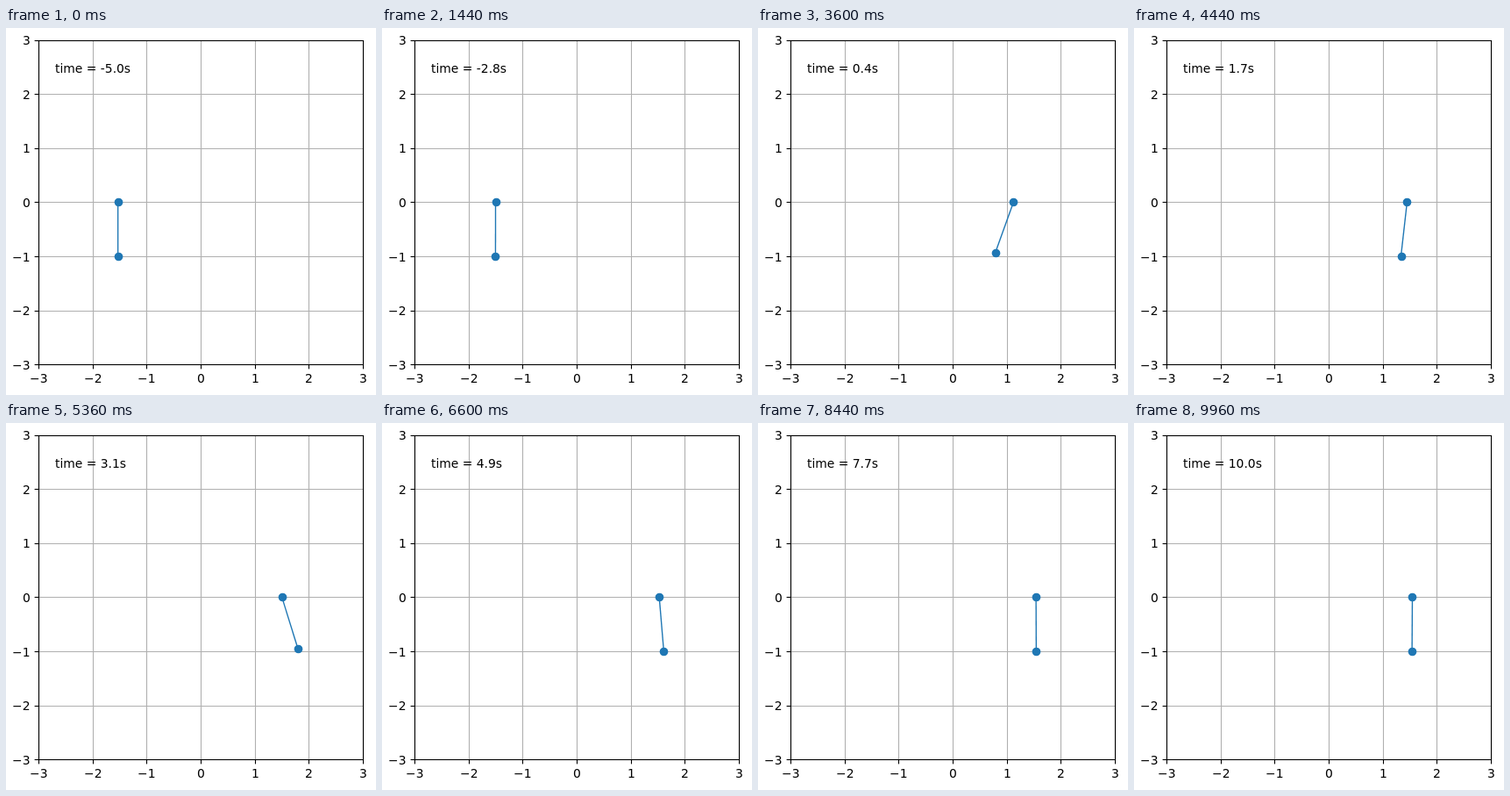
An HTML page with a canvas that plays this animation: 422 by 418 pixels, repeating every 10000 ms.

```html
<!DOCTYPE html>
<html lang="en">
<head>
<meta charset="utf-8">
<title>Pendulum on a moving pivot</title>
<style>
  html, body { margin: 0; width: 100%; height: 100%; overflow: hidden; background: #fff; }
  canvas { display: block; width: 422px; height: 418px; }
</style>
</head>
<body>
<canvas id="stage" width="422" height="418"></canvas>
<script>
const ctx = document.getElementById('stage').getContext('2d');
const FRAMES = 250, FRAME_MS = 40, T0 = -5, T1 = 10;
const LEFT = 37.15, TOP = 13.55, UNIT = 61.6, SPAN = 6;
const GRAVITY = 9.8, DAMPING = 1, SPEED = 5;
const DRIVE_LEAD = 0.015; // the bob reacts slightly ahead of the drawn pivot
const BLUE = '#1f77b4';

const px = x => LEFT + (x + 3) * UNIT;
const py = y => TOP + (3 - y) * UNIT;
const snap = v => Math.round(v) + 0.5;

const pivotX = t => Math.atan(SPEED * t);
const pivotAccel = t => -2 * SPEED ** 3 * t / (1 + (SPEED * t) ** 2) ** 2;
const angularAccel = (t, a, w) =>
  -GRAVITY * Math.sin(a) - pivotAccel(t + DRIVE_LEAD) * Math.cos(a) - DAMPING * w;

// Runge-Kutta integration of the swing, sampled once per frame
function solveSwing() {
  const substeps = 20, dt = (T1 - T0) / (FRAMES - 1), h = dt / substeps;
  const angles = [0];
  let a = 0, w = 0;
  for (let n = 0; n < FRAMES - 1; n++) {
    for (let s = 0; s < substeps; s++) {
      const t = T0 + n * dt + s * h;
      const a1 = w, w1 = angularAccel(t, a, w);
      const a2 = w + w1 * h / 2, w2 = angularAccel(t + h / 2, a + a1 * h / 2, a2);
      const a3 = w + w2 * h / 2, w3 = angularAccel(t + h / 2, a + a2 * h / 2, a3);
      const a4 = w + w3 * h, w4 = angularAccel(t + h, a + a3 * h, a4);
      a += (a1 + 2 * a2 + 2 * a3 + a4) * h / 6;
      w += (w1 + 2 * w2 + 2 * w3 + w4) * h / 6;
    }
    angles.push(a);
  }
  return angles;
}
const angles = solveSwing();

function line(x1, y1, x2, y2, color, width) {
  ctx.strokeStyle = color;
  ctx.lineWidth = width;
  ctx.beginPath();
  ctx.moveTo(x1, y1);
  ctx.lineTo(x2, y2);
  ctx.stroke();
}

function dot(x, y) {
  ctx.fillStyle = BLUE;
  ctx.beginPath();
  ctx.arc(snap(x), snap(y), 4.86, 0, Math.PI * 2);
  ctx.fill();
}

// align: 0 = left, 0.5 = centre, 1 = right; the text starts on a whole pixel
function text(s, x, y, align) {
  ctx.fillStyle = '#000';
  ctx.font = '13.89px "DejaVu Sans", sans-serif';
  ctx.fillText(s, Math.round(x - align * ctx.measureText(s).width), Math.round(y));
}

function drawAxes() {
  const left = snap(px(-3)), right = snap(px(3));
  const top = snap(py(3)), bottom = snap(py(-3));
  for (let v = -3; v <= 3; v++) {
    const x = snap(px(v)), y = snap(py(v));
    const label = String(v).replace('-', '\u2212');
    line(x, top, x, bottom, '#b0b0b0', 1.1);
    line(left, y, right, y, '#b0b0b0', 1.1);
    line(x, bottom, x, bottom + 4.9, '#000', 1.1);
    line(left - 4.9, y, left, y, '#000', 1.1);
    text(label, x, 404, 0.5);
    text(label, LEFT - 9.7, py(v) + 5.6, 1);
  }
  ctx.lineWidth = 1.1;
  ctx.strokeStyle = '#000';
  ctx.strokeRect(left, top, right - left, bottom - top);
}

function draw(n) {
  const t = T0 + (T1 - T0) * n / (FRAMES - 1);
  const x = pivotX(t), a = angles[n];
  const x1 = px(x), y1 = py(0);
  const x2 = px(x + Math.sin(a)), y2 = py(-Math.cos(a));
  ctx.fillStyle = '#fff';
  ctx.fillRect(0, 0, 422, 418);
  drawAxes();
  line(x1, y1, x2, y2, BLUE, 1.39);
  dot(x1, y1);
  dot(x2, y2);
  text('time = ' + t.toFixed(1) + 's', px(-3) + 0.05 * SPAN * UNIT, 51, 0);
}

function tick() {
  draw(Math.floor(performance.now() / FRAME_MS) % FRAMES);
  requestAnimationFrame(tick);
}
tick();
</script>
</body>
</html>
```
